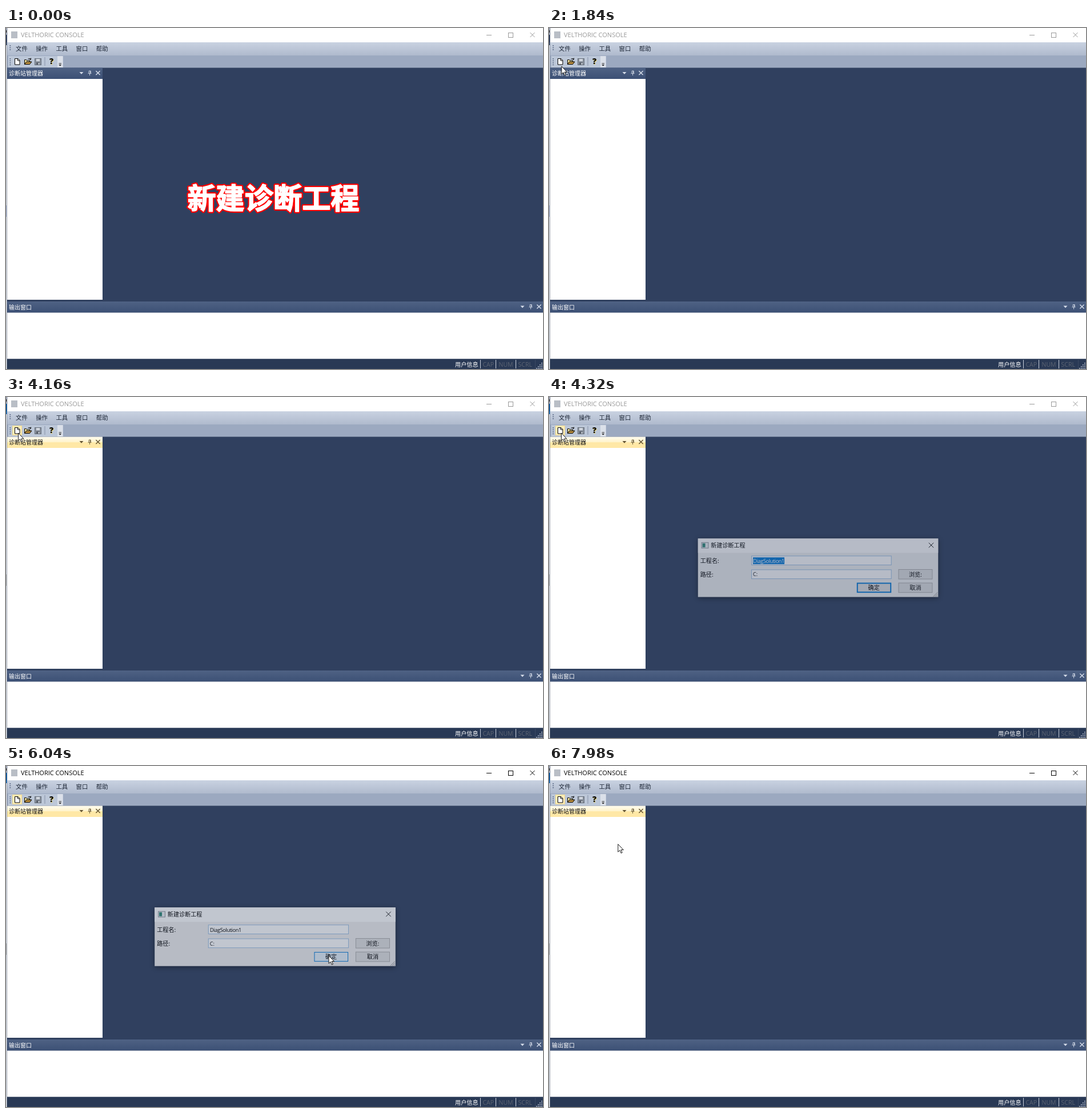
Recreate the animation shown at these times as an HTML page. Size 940 by 596 pixels, loop 8 s.

```html
<!DOCTYPE html>
<html lang="zh">
<head>
<meta charset="utf-8">
<title>新建诊断工程</title>
<style>
html, body { margin: 0; width: 100%; height: 100%; overflow: hidden; background: #30405f; }
svg { display: block; width: 100vw; height: 100vh; font-family: "Noto Sans CJK SC", "Noto Sans CJK", "Noto Sans", sans-serif; }
text { white-space: pre; }
.latin { font-family: "Open Sans", "Noto Sans", sans-serif; }
.chrome { --ink: #999; }
.active .chrome { --ink: #000; }
.panel { --bar: url(#cool); --ink: #fff; --icon: #d8dfeb; }
.warm #station { --bar: url(#gold); --ink: #111; --icon: #5f5030; }
.edge { fill: #2c3c5a; }
.warm .edge { fill: #0a5ba6; }
.edge2 { fill: #aab3cf; }
.warm .edge2 { fill: #b4b4b4; }
#newBtn { visibility: hidden; fill: #ffeeb8; stroke: #f0d88f; }
.hot #newBtn { visibility: visible; }
.pressed #newBtn { fill: #ffd27a; }
#okBtn { fill: #e1e1e1; stroke: #0078d7; stroke-width: 2; }
.over #okBtn { fill: #e5f1fb; stroke-width: 1; }
.down #okBtn { fill: #cce4f7; stroke: #005499; }
#selection { fill: #0078d7; }
#nameText { fill: #fff; }
.blurred #selection { fill: none; }
.blurred #nameText { fill: #000; }
#dialog { filter: drop-shadow(0 2px 5px rgba(0, 0, 0, .55)); }
#banner text { font-weight: 700; text-anchor: middle; stroke-linejoin: round; }
</style>
</head>
<body>
<svg id="stage" viewBox="0 0 940 596" preserveAspectRatio="none"></svg>
<script>
const stage = document.getElementById('stage');

const rect = (x, y, w, h, fill, extra = '') =>
  `<rect x="${x}" y="${y}" width="${w}" height="${h}" fill="${fill}" ${extra}/>`;
const box = (x, y, w, h, fill, stroke) =>
  rect(x + .5, y + .5, w - 1, h - 1, fill, `stroke="${stroke}"`);
const path = (d, stroke, fill = 'none', width = 1) =>
  `<path d="${d}" stroke="${stroke}" fill="${fill}" stroke-width="${width}"/>`;
// y is the vertical middle of the line
const label = (str, x, y, size, fill, extra = '') =>
  `<text x="${x}" y="${y + size * .37}" font-size="${size}" fill="${fill}" ${extra}>${str}</text>`;
const cross = (x, y, r, stroke, width = 1) =>
  path(`M${x - r} ${y - r}l${2 * r} ${2 * r}m0 ${-2 * r}l${-2 * r} ${2 * r}`, stroke, 'none', width);
const dots = (x, y, n) =>
  Array.from({ length: n }, (_, i) => rect(x, y + i * 3.5, 1.7, 1.7, '#53627f')).join('');
const gradient = (id, stops) =>
  `<linearGradient id="${id}" x2="0" y2="1">${stops.map(([at, c]) =>
    `<stop offset="${at}" stop-color="${c}"/>`).join('')}</linearGradient>`;

const panelBar = (id, title, y, w, iconX) => `<g class="panel" id="${id}">
  ${rect(2, y, w, 19.5, 'var(--bar)')}
  ${label(title, 5, y + 10, 10, 'var(--ink)')}
  ${path(`M${iconX - 3.5} ${y + 7.5}h7l-3.5 3.8z`, 'none', 'var(--icon)')}
  ${path(`M${iconX + 13.2} ${y + 9.5}v-4h3v4m-4.7 .3h6m-3 0v3.7m1-8v4`, 'var(--icon)', 'none', .9)}
  ${cross(iconX + 29, y + 9, 3.6, 'var(--icon)', 1.4)}</g>`;

const pushButton = (x, y, str) =>
  box(x, y, 61, 18, '#e1e1e1', '#adadad') +
  label(str, x + 30.5, y + 9, 10.3, '#000', 'text-anchor="middle"');

const grip = () => {
  let out = '';
  for (let r = 0; r < 4; r++)
    for (let c = 0; c <= r; c++) out += rect(937 - c * 3, 585 + r * 3, 1.6, 1.6, '#c3cbd9');
  return out;
};

const defs = `<defs>
  ${gradient('menu', [[0, '#c9d2e1'], [1, '#afbacd']])}
  ${gradient('cool', [[0, '#4f6284'], [1, '#3c5075']])}
  ${gradient('gold', [[0, '#fffcf0'], [.48, '#fff3cb'], [.52, '#ffe8a6'], [1, '#ffe8a6']])}
  ${gradient('tip', [[0, '#fff'], [1, '#e4e5f0']])}
</defs>`;

const titleBar = `<g class="chrome">
  ${rect(2, 0, 938, 25, '#fff')}
  ${rect(9, 6, 11, 12, '#b9bec6')}
  ${label('VELTHORIC CONSOLE', 26, 12, 11, 'var(--ink)', 'class="latin"')}
  ${path('M841 12.5h9', 'var(--ink)')}
  ${box(879, 8, 9, 9, 'none', 'var(--ink)')}
  ${cross(921.5, 12, 4, 'var(--ink)')}</g>`;

const menuBar = rect(2, 25, 938, 23, 'url(#menu)') + dots(6.5, 30, 3) +
  ['文件', '操作', '工具', '窗口', '帮助'].map((s, i) =>
    label(s, 17 + i * 35.2, 36.5, 10.4, '#1b2434')).join('');

const toolBar = rect(2, 48, 938, 21.5, '#9ca9c0') +
  rect(4, 49, 96, 20, '#bcc7d8') + rect(90, 49, 9.5, 20, '#dbe0e9') + dots(6.5, 53, 4) +
  '<rect id="newBtn" x="11.5" y="50.5" width="16" height="16"/>' +
  path('M15.5 53.5h5.5l3 3v7.5h-8.5z', '#000', '#fff') + path('M20.5 53.5v3.5h3.5', '#000') +
  path('M32.5 63.5v-8h3l1 1.5h5v2', '#000', '#f4e6a0') +
  path('M32.5 63.5l3-4.5h9.5l-3.5 4.5z', '#000', '#b98d3e') +
  path('M38.5 54.5q2.5-2.5 4.5 0m.5-2v2.5h-2.5', '#000') +
  box(50, 53, 12, 12, '#8b939f', '#646c78') + rect(53, 54, 6, 4, '#d2d7df') + rect(53, 60, 6, 4, '#59606b') +
  rect(56.5, 61, 2, 3, '#d2d7df') +
  rect(67.5, 51, 1, 15, '#8591a8') +
  label('?', 76.8, 58.5, 14, '#f2df7e', 'class="latin" font-weight="800"') +
  label('?', 76.1, 58, 14, '#000', 'class="latin" font-weight="800"') +
  rect(92.5, 61.5, 4.5, 1, '#222') + path('M92.2 64h5l-2.5 2.6z', 'none', '#222');

const statusBar = rect(2, 578.5, 938, 17.5, '#293955') +
  label('用户信息', 786, 588, 10.2, '#fff') +
  [830, 857, 892, 926].map((x, i) => rect(x, 580, 1, 15, i < 3 ? '#c9d0dc' : '#3a4963')).join('') +
  [['CAP', 834.5], ['NUM', 862.5], ['SCRL', 896.5]].map(([s, x]) =>
    label(s, x, 588, 10.5, '#5c6473', 'class="latin"')).join('') + grip() +
  `<g id="hint">${label('新建诊断工程', 5, 588, 10, '#fff')}</g>`;

const dialog = `<g id="dialog">
  ${rect(257, 246.5, 428, 104, '#f0f0f0')}
  ${rect(257, 246.5, 428, 25.5, '#fff')}
  ${box(263, 253, 13, 11, '#eef1f3', '#8d959c')}${rect(265, 255, 5, 7, '#2f8a78')}
  ${label('新建诊断工程', 280, 258.7, 10.25, '#000')}
  ${cross(672.5, 258.3, 4.3, '#111')}
  ${label('工程名:', 261, 286, 10.3, '#000')}
  ${label('路径:', 261, 310, 10.3, '#000')}
  ${box(352, 277, 250, 17, '#fff', '#9dbfe3')}
  ${box(352, 301.5, 250, 17, '#fff', '#9dbfe3')}
  <rect id="selection" x="355" y="280" width="56" height="12"/>
  <text id="nameText" class="latin" x="355.3" y="289.4" font-size="9.4" letter-spacing="-.42">DiagSolution1</text>
  ${label('C:', 355, 310.3, 9.4, '#111', 'class="latin"')}
  ${pushButton(614, 301, '浏览:')}
  ${pushButton(614, 325, '取消')}
  <rect id="okBtn" x="541" y="326" width="59.5" height="16"/>
  ${label('确定', 570.5, 334, 10.3, '#000', 'text-anchor="middle"')}
  ${path('M676 350l8-8m-5 8l5-5m-2 5l2-2', '#9a9a9a')}
</g>`;

const bannerLine = (stroke, width) =>
  label('新建诊断工程', 468, 297, 50.2, '#fff', `stroke="${stroke}" stroke-width="${width}"`);

stage.innerHTML = defs + rect(0, 0, 940, 596, '#30405f') +
  rect(0, 0, 1, 596, '#eceef2') + rect(1, 25, 1, 571, '#8d95a3') +
  rect(0, 4, 1.6, 4, '#555') + '<rect class="edge" y="12" width="1.6" height="18"/>' +
  '<rect class="edge2" y="310" width="1.2" height="20"/>' +
  titleBar + menuBar + toolBar +
  panelBar('station', '诊断站管理器', 69.5, 167, 132) + rect(2, 89, 167, 386, '#fff') +
  panelBar('output', '输出窗口', 478, 938, 904) + rect(2, 497.5, 938, 81, '#fff') +
  statusBar +
  `<g id="tooltip">${box(21, 78, 65, 17, 'url(#tip)', '#767676')}${label('新建诊断工程', 23.5, 86.5, 10, '#4c4c4c')}</g>` +
  dialog +
  `<g id="banner">${bannerLine('#f00', 6)}${bannerLine('#fff', 1.6)}</g>` +
  `<g id="cursor">${path('M0 0v13.6l3.1-2.9 2.2 5 2.1-.9-2.2-4.8h4.3z', '#000', '#fff', .9)}</g>`;

const el = id => document.getElementById(id);
const [hint, tooltip, dlg, banner, cursor] = ['hint', 'tooltip', 'dialog', 'banner', 'cursor'].map(el);

// pointer path: time, x, y
const track = [
  [732, 437, 199], [1100, 230, 140], [1590, 16, 79], [1824, 22, 67], [1980, 24, 74], [2440, 30, 74],
  [2750, 21, 63.5], [2980, 21, 63.5], [2994, 21.5, 63], [4640, 21.5, 63], [4944, 374.5, 320.5],
  [5100, 470, 342], [5412, 564, 331], [5560, 564, 331], [5570, 565, 331.5], [7050, 565, 331.5],
  [7440, 73, 150], [7660, 121, 139], [7740, 121, 139], [7820, 121, 137], [7900, 120.8, 136.6], [8000, 120.8, 136.6]
];
const TICK = 78;

function pointerAt(t) {
  const s = 810 + Math.floor((t - 810) / TICK) * TICK;
  const i = track.findIndex(k => k[0] > s);
  if (i < 1) return track[0].slice(1);
  const [t0, x0, y0] = track[i - 1], [t1, x1, y1] = track[i];
  const p = (s - t0) / (t1 - t0);
  return [x0 + (x1 - x0) * p, y0 + (y1 - y0) * p];
}

function dialogLevel(t) {
  if (t < 4240 || t >= 6190) return 0;
  if (t < 4480) return 1 - Math.pow(1 - Math.floor((t - 4160) / 80) / 4, 1.5);
  if (t < 6040) return 1;
  return t < 6115 ? .7 : .3;
}

const show = (node, on) => node.setAttribute('visibility', on ? 'visible' : 'hidden');

function draw(t) {
  const within = (a, b = 8000) => t >= a && t < b;
  const flags = {
    active: within(1980, 4160) || within(6040),
    warm: within(1980),
    hot: within(2590),
    pressed: within(4000, 4160),
    over: within(5334),
    down: within(5800, 5890),
    blurred: within(5800)
  };
  for (const name in flags) stage.classList.toggle(name, flags[name]);

  show(banner, t < 500);
  show(hint, within(2590, 4160));
  show(tooltip, within(3620, 4000));
  tooltip.setAttribute('opacity', t < 3700 ? .5 : 1);

  const level = dialogLevel(t), scale = .95 + .05 * level;
  show(dlg, level > 0);
  dlg.setAttribute('opacity', level);
  dlg.setAttribute('transform', `translate(471 298) scale(${scale}) translate(-471 -298)`);

  show(cursor, t >= 500);
  cursor.setAttribute('transform', `translate(${pointerAt(t)})`);
}

const start = performance.now();
function loop() {
  draw((performance.now() - start) % 8000);
  requestAnimationFrame(loop);
}
loop();
</script>
</body>
</html>
```
